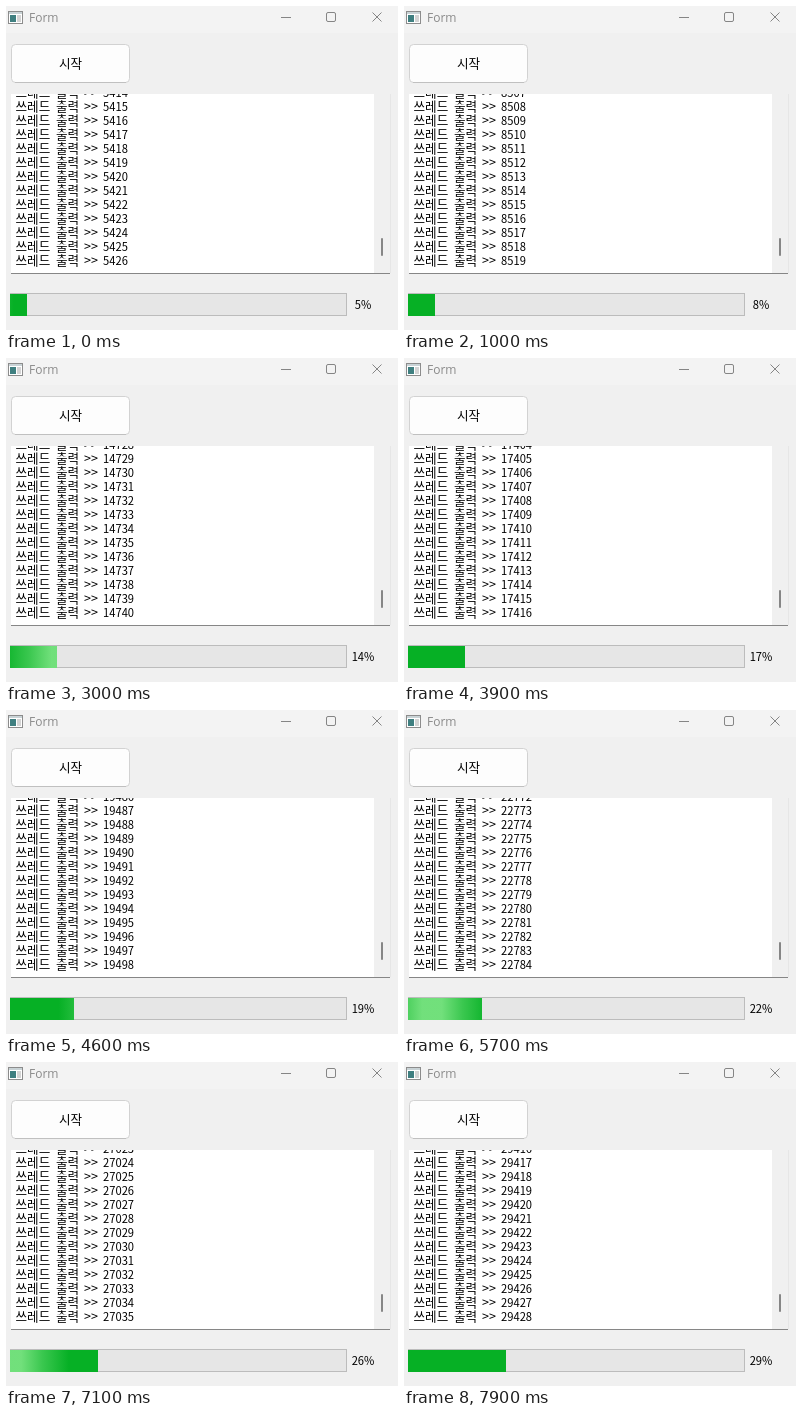
These frames come from a looping animation (392 px wide and 324 px high, 8000 ms). An HTML page:

```html
<!DOCTYPE html>
<html lang="ko">
<head>
<meta charset="utf-8">
<title>Form</title>
<style>
html, body { margin: 0; width: 100%; height: 100%; overflow: hidden; background: #f0f0f0; }
svg { display: block; }
text { font-family: "Noto Sans CJK KR", "Noto Sans CJK", "Noto Sans CJK JP", sans-serif; font-size: 12.6px; fill: #000; }
.title { font-family: "Open Sans", "Noto Sans", sans-serif; font-size: 12px; fill: #8a8a8a; }
.num { font-size: 11.2px; }
</style>
</head>
<body>
<svg width="392" height="324" viewBox="0 0 392 324">
  <defs>
    <linearGradient id="glow">
      <stop offset=".08" stop-color="#7be483" stop-opacity="0"/>
      <stop offset=".28" stop-color="#7be483" stop-opacity=".45"/>
      <stop offset=".44" stop-color="#7be483" stop-opacity=".92"/>
      <stop offset=".58" stop-color="#7be483" stop-opacity=".92"/>
      <stop offset=".73" stop-color="#7be483" stop-opacity=".45"/>
      <stop offset=".92" stop-color="#7be483" stop-opacity="0"/>
    </linearGradient>
    <clipPath id="view"><rect x="5" y="88" width="363" height="179"/></clipPath>
    <clipPath id="done"><rect id="clip" x="4" y="288" width="17" height="22"/></clipPath>
  </defs>

  <rect width="392" height="324" fill="#f0f0f0"/>
  <rect width="392" height="27" fill="#f3f3f3"/>

  <rect x="2.5" y="5.5" width="14" height="12" fill="#fff" stroke="#8c8c8c"/>
  <rect x="3" y="6" width="13" height="2" fill="#c9d3d6"/>
  <rect x="4" y="9" width="6" height="7" fill="#3f7f80"/>
  <rect x="11" y="9" width="4" height="7" fill="#d4d4d4"/>
  <text class="title" x="23" y="16">Form</text>
  <g fill="none" stroke="#858585">
    <path d="M275 11.5h10M366.5 6.5l9 9M375.500 6.500l-9 9"/>
    <rect x="320.500" y="6.500" width="9" height="9" rx="1.500"/>
  </g>

  <rect x="5.500" y="38.500" width="118" height="38" rx="4" fill="#fdfdfd" stroke="#d2d2d2"/>
  <path d="M9 76.500h111" stroke="#c0c0c0"/>
  <text x="64.500" y="62.300" text-anchor="middle">시작</text>

  <rect x="5" y="88" width="363" height="179" fill="#fff"/>
  <path d="M384.500 88v179" stroke="#e6e6e6"/>
  <path d="M5 267.500h379" stroke="#868686"/>
  <rect x="375" y="232" width="2" height="18" rx="1" fill="#868686"/>
  <g id="log" clip-path="url(#view)"></g>

  <rect x="4.500" y="287.500" width="336" height="22" fill="#e6e6e6" stroke="#bcbcbc"/>
  <g clip-path="url(#done)">
    <rect x="4" y="288" width="337" height="22" fill="#06b025"/>
    <rect id="shine" y="288" width="140" height="22" fill="url(#glow)"/>
  </g>
  <text id="percent" class="num" x="357" y="302.500" text-anchor="middle">5%</text>
</svg>
<script>
const LOOP = 8000, STEP = 100, ROWS = 13;
const GLOW = 140, GLOW_SPEED = 0.25;

// [time, last printed number]
const counts = [[0, 5426], [1900, 11303], [3000, 14740], [4600, 19498],
                [5700, 22784], [7100, 27035], [7900, 29428]];
// moments at which the glow starts over
const sweeps = [-60, 1190, 2520, 3890, 5330, 6820];

const get = id => document.getElementById(id);
const clip = get("clip"), shine = get("shine"), percent = get("percent");

function addText(x, y, text, cls = "") {
  const el = document.createElementNS("http://www.w3.org/2000/svg", "text");
  el.setAttribute("x", x);
  el.setAttribute("y", y);
  el.setAttribute("class", cls);
  el.textContent = text;
  get("log").append(el);
  return el;
}

const numbers = Array.from({ length: ROWS }, (_, i) => {
  const y = 90.5 + 14 * i;
  addText(9.5, y, "쓰레드");
  addText(50, y, "출력");
  addText(78, y, ">>");
  return addText(97, y, "", "num");
});

function countAt(t) {
  let i = 1;
  while (i < counts.length - 1 && t > counts[i][0]) i++;
  const [t0, n0] = counts[i - 1], [t1, n1] = counts[i];
  return Math.round(n0 + (n1 - n0) * (t - t0) / (t1 - t0));
}

function draw(t) {
  const n = countAt(t);
  numbers.forEach((el, i) => el.textContent = n - ROWS + 1 + i);

  // the bar trails the log slightly
  const p = Math.floor((n - 40) / 1000);
  percent.textContent = p + "%";
  clip.setAttribute("width", Math.round(3.37 * p));

  const start = sweeps.filter(s => s <= t).pop();
  shine.setAttribute("x", 4 - GLOW + (t - start) * GLOW_SPEED);
}

const origin = performance.now();
function tick() {
  const t = (performance.now() - origin) % LOOP;
  draw(Math.floor(t / STEP) * STEP);
  requestAnimationFrame(tick);
}
tick();
</script>
</body>
</html>
```
